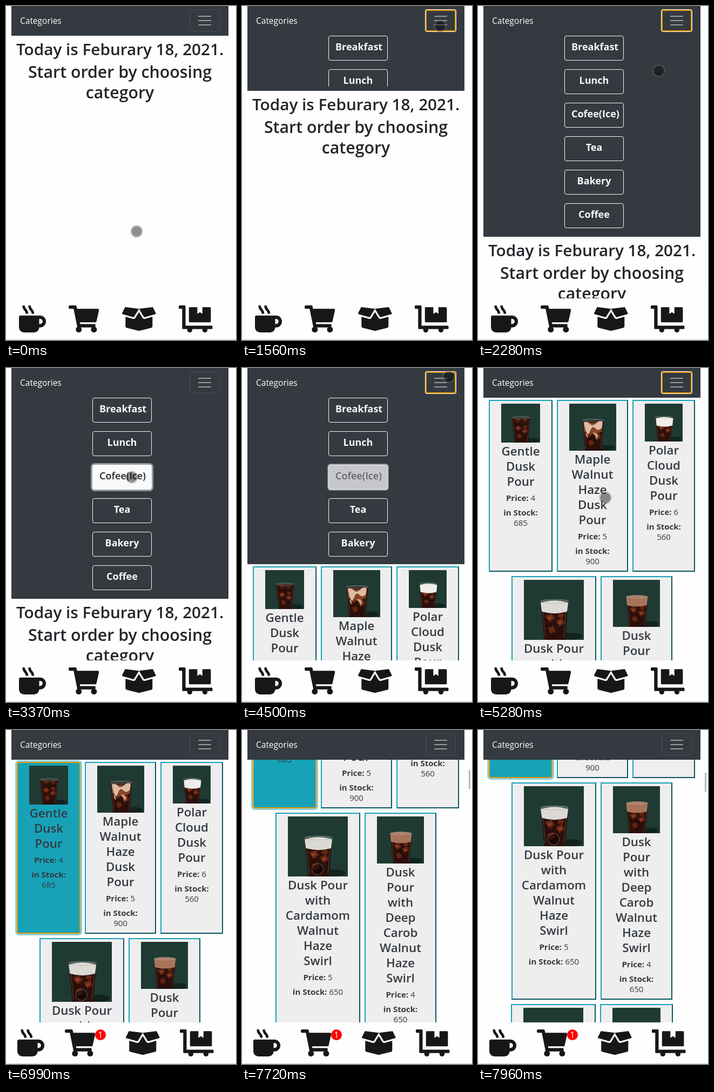
Recreate the animation shown at these times as an HTML page. Size 426 px wide and 618 px high, loop 8000 ms.

```html
<!DOCTYPE html>
<html lang="en">
<head>
<meta charset="utf-8">
<title>Order menu</title>
<style>
@property --nav { syntax: "<length>"; inherits: true; initial-value: 55px; }
@property --scroll { syntax: "<length>"; inherits: true; initial-value: 0px; }
@property --x { syntax: "<length>"; inherits: true; initial-value: 242px; }
@property --y { syntax: "<length>"; inherits: true; initial-value: 417px; }
@property --added { syntax: "<number>"; inherits: true; initial-value: 0; }

* { box-sizing: border-box; }
html, body { margin: 0; width: 100%; height: 100%; overflow: hidden; background: #fff; }
body { font: 15.5px "Open Sans", "Noto Sans", sans-serif; color: #212529; }
#stage {
  --loop: 8s -4ms infinite;
  position: relative; width: 426px; height: 618px; overflow: hidden; background: #fefefe;
  animation: nav var(--loop) step-end, scroll var(--loop) linear,
    point var(--loop) linear, added var(--loop) step-end;
}
#stage div, #stage svg, #stage span { position: absolute; }

/* navigation bar */
#nav { left: 10px; top: 0; width: 402px; height: var(--nav); background: #343a40; color: #fff; }
#brand { left: 16px; top: 8px; line-height: 39px; }
#toggler { left: 330px; top: 7px; width: 56px; height: 40px; border: 1px solid #ffffff1a; border-radius: 4px; }
#toggler svg { left: 15px; top: 10px; }
#ring {
  left: -1px; top: -1px; width: 56px; height: 40px; border: 2px solid #e59700; border-radius: 3px;
  box-shadow: 0 0 0 1px #fff; animation: ring var(--loop) step-end;
}
#menu { left: 0; top: 48px; width: 402px; height: calc(var(--nav) - 56px); overflow: hidden; }
#menu div {
  left: 150px; width: 110px; height: 46px; padding: 0 12px; border: 1px solid #f8f9fa; border-radius: 4px;
  font-size: 18px; font-weight: 700; line-height: 38px; text-align: center; white-space: nowrap; color: #f8f9fa;
}
#menu div:nth-child(3) { animation: pick var(--loop) step-end; }

/* page */
#main { left: 0; top: 0; width: 426px; height: 541px; overflow: hidden; }
#title {
  left: 0; top: var(--nav); width: 422px; font-weight: 600; line-height: 38px;
  text-align: center; white-space: nowrap; animation: title var(--loop) step-end;
}
#title p { margin: 6px 0 4px; font-size: 29.7px; }
#title p + p { margin: 0; font-size: 30.3px; }
#cards { left: 0; top: calc(var(--nav) + 4px - var(--scroll)); animation: cards var(--loop) step-end; }
.card {
  border: 2px solid; border-color: #17a2b8 #0b5562 #0b5562 #17a2b8; background: #eee; color: #343a40;
  padding-top: 5px; font-size: 15px; line-height: 19px; text-align: center; white-space: pre;
}
#stage .card svg { position: static; display: block; margin: 0 auto 2px; background: #1f3a33; }
.card h4 { margin: 0 0 7px; font-size: 22.3px; font-weight: 600; line-height: 28px; }
.card p { margin: 0 0 8px; }
.card b { font-weight: 700; }
.card:first-child { animation: card var(--loop) step-end; }
.thumb { left: 420px; width: 3px; background: #b8b8b8; }
#thumb1 { top: 431px; height: 92px; animation: thumb1 var(--loop) step-end; }
#thumb2 { top: calc(55px + var(--scroll) * .083); height: 35px; animation: thumb2 var(--loop) step-end; }

/* footer */
#foot { left: 0; top: 541px; width: 426px; height: 77px; background: #fefefe; border-bottom: 1px solid #ccc; }
#foot svg { width: 64px; height: 50px; top: 13px; fill: #171717; transform: translateX(calc(var(--added) * var(--d))); }
#badge {
  left: 165px; top: 13px; width: 20px; height: 20px; border-radius: 50%; background: #f00; color: #fff;
  line-height: 20px; text-align: center; opacity: var(--added);
}

#cursor {
  left: 0; top: 0; width: 23px; height: 23px; border-radius: 50%; border: 2px solid #6e6e6e66;
  background: #00000070 padding-box;
  transform: translate(calc(var(--x) - 11.5px), calc(var(--y) - 11.5px - var(--scroll)));
}

@keyframes nav {
  0% { --nav: 55px; } 19.5% { --nav: 157px; } 21.375% { --nav: 382px; } 23.25% { --nav: 427px; }
  56.25% { --nav: 363px; } 57.91% { --nav: 129px; } 59.575% { --nav: 60px; } 61.24%, 100% { --nav: 55px; }
}
@keyframes scroll {
  0% { --scroll: 0px; }
  89.11% { --scroll: 0px; animation-timing-function: steps(2, start); }
  92.57% { --scroll: 50px; animation-timing-function: steps(2, start); }
  96.04% { --scroll: 190px; animation-timing-function: steps(2, start); }
  99.49% { --scroll: 275px; }
  99.5%, 100% { --scroll: 288px; }
}
@keyframes point {
  0% { --x: 242px; --y: 417px; }
  3.875% { --x: 242px; --y: 417px; animation-timing-function: steps(2, start); }
  7.325% { --x: 273px; --y: 322px; animation-timing-function: steps(2, start); }
  10.775% { --x: 342px; --y: 113px; animation-timing-function: steps(2, start); }
  14.225% { --x: 367px; --y: 37px; }
  26.625% { --x: 367px; --y: 37px; animation-timing-function: steps(2, start); }
  30.175% { --x: 335px; --y: 120px; animation-timing-function: steps(4, start); }
  37.275% { --x: 233px; --y: 202px; }
  44.05% { --x: 233px; --y: 202px; animation-timing-function: steps(2, start); }
  47.48% { --x: 265px; --y: 165px; animation-timing-function: steps(2, start); }
  50.9% { --x: 345px; --y: 65px; animation-timing-function: steps(2, start); }
  54.34% { --x: 383px; --y: 16px; }
  57.91% { --x: 383px; --y: 16px; animation-timing-function: steps(2, start); }
  61.15% { --x: 365px; --y: 45px; animation-timing-function: steps(2, start); }
  64.1% { --x: 275px; --y: 180px; animation-timing-function: steps(2, start); }
  67.874% { --x: 236px; --y: 240px; }
  67.875% { --x: 165px; --y: 257px; }
  69.75% { --x: 165px; --y: 257px; animation-timing-function: steps(3, start); }
  75.375% { --x: 67px; --y: 217px; }
  82.06% { --x: 67px; --y: 217px; animation-timing-function: steps(2, start); }
  85.44% { --x: 130px; --y: 440px; }
  87.374% { --x: 130px; --y: 440px; }
  87.375%, 100% { --x: 140px; --y: 490px; }
}
@keyframes added { 0% { --added: 0; } 80.375%, 100% { --added: 1; } }
@keyframes ring {
  0%, 40.625%, 80.375%, 100% { opacity: 0; }
  19.5%, 56.25% { opacity: 1; }
}
@keyframes pick {
  0%, 57.91%, 100% { background: none; color: #f8f9fa; box-shadow: none; font-weight: 700; }
  40.625% { background: #f8f9fa; color: #212529; box-shadow: 0 0 0 3px #f8f9fa80; font-weight: 600; }
  56.25% { background: #c7c7cb; color: #5f6367; box-shadow: 0 0 0 2px #f8f9fa70; font-weight: 600; }
}
@keyframes title { 0% { opacity: 1; } 42.34%, 100% { opacity: 0; } }
@keyframes cards { 0% { opacity: 0; } 42.34%, 100% { opacity: 1; } }
@keyframes card {
  0% { background: #eee; }
  80.375%, 100% {
    background: #17a2b8; border-color: #e59700; border-radius: 4px; box-shadow: 0 0 0 3px #8fd0de;
  }
}
@keyframes thumb1 {
  0% { opacity: 0; } 23.25% { opacity: .9; } 26.625% { opacity: .55; } 28.4% { opacity: .12; } 30.175%, 100% { opacity: 0; }
}
@keyframes thumb2 { 0% { opacity: 0; } 89.11%, 100% { opacity: 1; } }
</style>
</head>
<body>
<div id="stage">
  <div id="main">
    <div id="title"><p>Today is Feburary 18, 2021.</p><p>Start order by choosing<br>category</p></div>
    <div id="cards"></div>
    <div class="thumb" id="thumb1"></div>
    <div class="thumb" id="thumb2"></div>
  </div>
  <div id="nav">
    <span id="brand">Categories</span>
    <div id="toggler">
      <svg width="24" height="18" stroke="#fff" stroke-opacity=".5" stroke-width="2" stroke-linecap="round"><path d="M1 1h22M1 9h22M1 17h22"/></svg>
      <div id="ring"></div>
    </div>
    <div id="menu"></div>
  </div>
  <div id="foot">
    <svg viewBox="0 0 655 512" style="left:24px;--d:-3px">
      <path id="steam" d="M127 146c1 8 8 14 16 14h17c10 0 17-9 16-18-4-28-16-54-37-75-14-14-23-33-26-53C112 6 105 0 97 0H80C71 0 63 9 64 18c4 32 18 61 41 84 12 13 19 28 22 44z"/>
      <use href="#steam" x="112"/>
      <path fill-rule="evenodd" d="M400 192H32a32 32 0 0 0-32 32V416a96 96 0 0 0 96 96H288a96 96 0 0 0 96-96h16a112 112 0 0 0 0-224zM400 352H384V256h16a48 48 0 0 1 0 96z"/>
    </svg>
    <svg viewBox="0 0 655 512" style="left:116px;--d:-7px">
      <path d="M528 301l47-208C579 78 567 64 552 64H159l-9-45C148 8 138 0 127 0H24A24 24 0 0 0 0 24V40A24 24 0 0 0 24 64H94l70 343 30 9H480l24-10 6-25c3-15-8-29-24-29H218l-6-32H505c11 0 20-8 23-19z"/>
      <circle cx="192" cy="456" r="56"/><circle cx="480" cy="456" r="56"/>
    </svg>
    <svg viewBox="0 0 655 512" style="left:215px;--d:7px">
      <path id="flap" d="M53 41L2 144c-5 9 0 20 10 23l198 56c7 2 14-1 18-7L320 64 70 32c-7-1-14 3-17 9z"/>
      <use href="#flap" transform="matrix(-1 0 0 1 640 0)"/>
      <path d="M426 256c-17 0-33-9-42-24L320 126 256 232c-11 19-33 28-55 22L64 215V393c0 15 10 28 24 31l216 54q16 4 32 0l216-54c14-3 24-16 24-31V215L439 254q-6 2-13 2z"/>
    </svg>
    <svg viewBox="0 0 655 512" style="left:320px;--d:2px">
      <path d="M208 320H592a16 16 0 0 0 16-16V48A16 16 0 0 0 592 32H448V160l-48-32-48 32V32H208A16 16 0 0 0 192 48V304a16 16 0 0 0 16 16z"/>
      <path d="M624 384H128V16A16 16 0 0 0 112 0H16A16 16 0 0 0 0 16V48A16 16 0 0 0 16 64H64V432a16 16 0 0 0 16 16H624a16 16 0 0 0 16-16V400a16 16 0 0 0-16-16z"/>
      <circle cx="208" cy="464" r="48"/><circle cx="496" cy="464" r="48"/>
    </svg>
    <div id="badge">1</div>
  </div>
  <div id="cursor"></div>
</div>
<script>
const byId = id => document.getElementById(id);

byId("menu").innerHTML = ["Breakfast", "Lunch", "Cofee(Ice)", "Tea", "Bakery", "Coffee"]
  .map((name, i) => `<div style="top:${7 + i * 62}px">${name}</div>`).join("");

const ice = `<path fill="#7a2c16" opacity=".75" d="M35 60l11-4 6 8-9 7zM53 68l11-5 4 9-9 6zM40 80l9-3 4 9-9 4zM58 55l9 2-2 6-9-1z"/>
  <path fill="#b5603a" opacity=".45" d="M38 63l7-3 2 4-6 3zM56 71l6-3 2 4-6 2z"/>`;

const tops = {
  plain: `<path fill="#4a2114" d="M32 40l12-4 8 6-9 7zM55 39l13-2-2 10-9 2z"/>`,
  swirl: `<path fill="#8a4526" d="M30 38q20 7 42-1l-3 22q-18 9-37 0z"/>
    <path fill="#dcbca2" d="M31 40q8-3 13 3t14-2 13-1l-2 12q-8 7-14 0t-11 7-10-6z"/>
    <path fill="#c99a7a" d="M50 62q9-2 12 6l-5 9q1-8-6-13zM35 62q5 2 5 11-5-2-5-11z"/>`,
  cream: `<path fill="#f1eee9" d="M29 39q23-7 46 0l-2 19q-21 6-42 0z"/>`,
  foam: `<path fill="#dcd9d4" d="M28 38q23-7 46 0l-2 15q-21 6-42 0z"/>`,
  cocoa: `<path fill="#a87358" d="M28 36q23-7 46 0l-2 18q-21 6-42 0z"/>`
};

// Iced drink in a tumbler on a green backdrop
const drink = (kind, size) => `<svg width="${size}" height="${size}" viewBox="0 0 100 100">` + (kind ? `
  <ellipse cx="78" cy="94" rx="19" ry="6" fill="#12231f"/>
  <path fill="#2b0f0a" d="M28 36H74L69 100H34z"/>${ice}${tops[kind]}
  <ellipse cx="51" cy="36" rx="23" ry="3" fill="#ffffff18" stroke="#a9b0aa" stroke-opacity=".6"/>
  <path stroke="#fff" stroke-opacity=".2" d="M31 42l5 54M71 42l-4 54"/>` : "") + `</svg>`;

const rows = [
  { y: 0, h: 318, cards: [
    [20, 118, 72, "plain", "Gentle/Dusk/Pour", 4, "\n685"],
    [146, 132, 87, "swirl", "Maple/Walnut/Haze/Dusk/Pour", 5, "\n900"],
    [286, 116, 70, "cream", "Polar/Cloud/Dusk/Pour", 6, "\n560"]] },
  { y: 326, h: 402, cards: [
    [62, 157, 111, "foam", "Dusk Pour/with/Cardamom/Walnut/Haze/Swirl", 5, " 650"],
    [227, 133, 87, "cocoa", "Dusk/Pour/with/Deep/Carob/Walnut/Haze/Swirl", 4, "\n650"]] },
  { y: 736, h: 300, cards: [[61, 157, 111], [226, 135, 89]] }
];

const label = (name, price, stock) => name
  ? `<h4>${name.replaceAll("/", "\n")}</h4><p><b>Price:</b> ${price}</p><p><b>in Stock:</b>${stock}</p>` : "";

byId("cards").innerHTML = rows.map(({ y, h, cards }) => cards.map(([x, w, size, kind, ...text]) =>
  `<div class="card" style="left:${x}px;top:${y}px;width:${w}px;height:${h}px">${drink(kind, size)}${label(...text)}</div>`
).join("")).join("");
</script>
</body>
</html>
```
